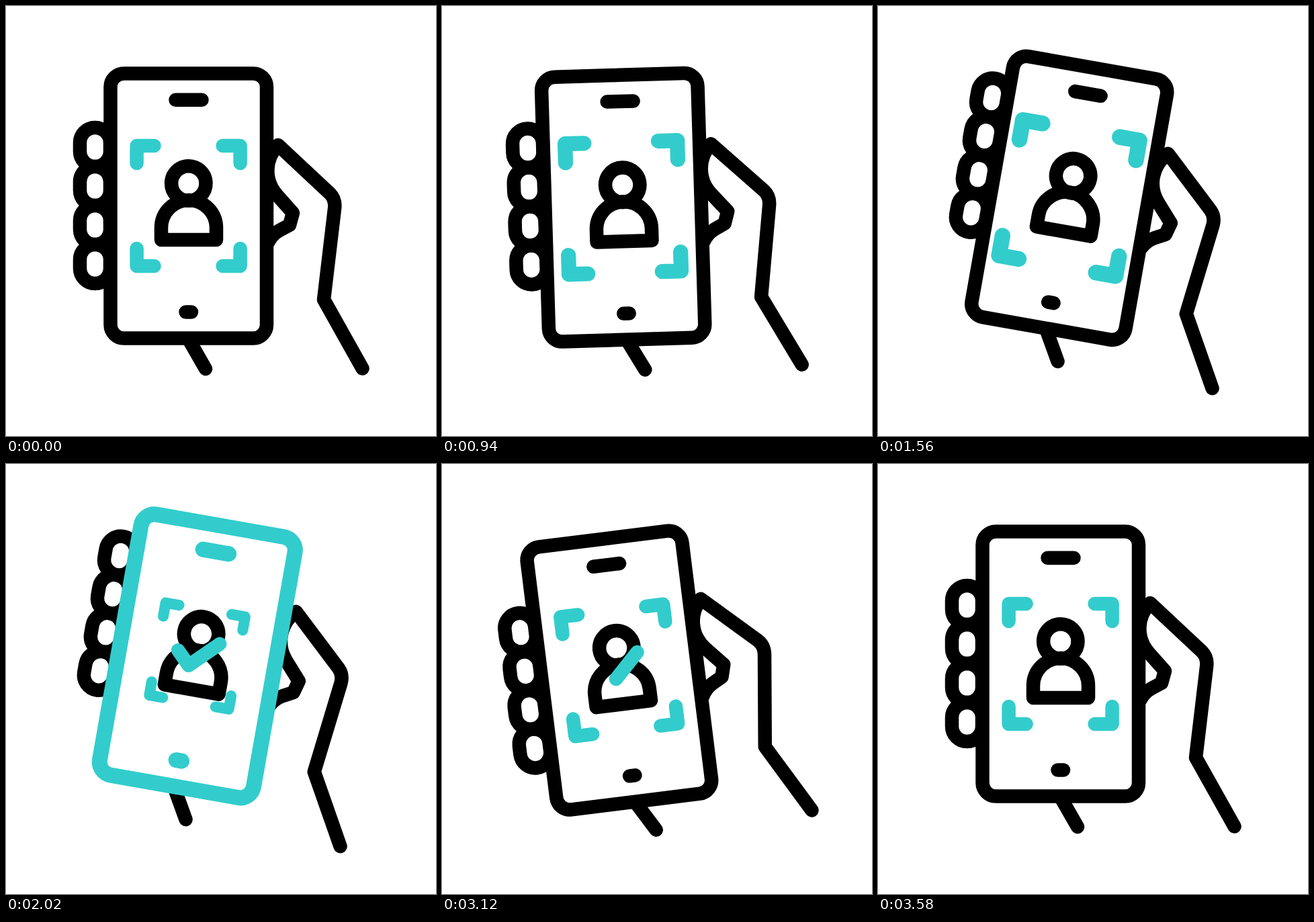
Recreate the animation shown at these times as an HTML page. Size 640 px wide and 640 px high, loop 3600 ms.

```html
<!DOCTYPE html>
<html lang="en">
<head>
<meta charset="utf-8">
<title>Face scan on a phone</title>
<style>
  html, body { margin: 0; width: 100%; height: 100%; overflow: hidden; background: #fff; }
  svg { display: block; width: 100%; height: 100%; }
  g { fill: none; stroke: #000; stroke-width: 20.5; stroke-linecap: round; stroke-linejoin: round; }
  .accent { stroke: #3cc; }
  #highlight { stroke-width: 23; }
</style>
</head>
<body>
<svg viewBox="0 0 640 640">
  <defs>
    <path id="frame" pathLength="1" d="M271.5 100.5H368a20 20 0 0 1 20 20V474.5a20 20 0 0 1-20 20H175.5a20 20 0 0 1-20-20V120.5a20 20 0 0 1 20-20Z"/>
    <path id="speaker" pathLength="1" d="M252.5 139.7h39"/>
    <path id="home" pathLength="1" d="M267.5 455.5h8.5"/>
    <rect id="finger" x="110" y="181" width="45" height="58" rx="22.5"/>
    <path id="corner" d="M-77-63.5v-26h26"/>
  </defs>
  <g id="scene">
    <g id="fingers"></g>
    <path id="wrist" d="M266 486L297 540"/>
    <path id="thumb" d="M390 352Q396 340 407 334L422 326L427 308L403 281C384 259 385 228 405 207L482 279Q491 288 489 302L473 437L530.5 539.5"/>
    <use href="#frame" fill="#fff"/>
    <use href="#speaker"/>
    <use href="#home"/>
    <circle cx="271.8" cy="264" r="25.7"/>
    <path id="body" d="M231 348V330a41 41 0 0 1 82 0V348Z"/>
    <g id="corners" class="accent"></g>
    <g id="highlight" class="accent">
      <use href="#frame"/><use href="#speaker"/><use href="#home"/>
    </g>
    <g id="check" class="accent">
      <path pathLength="1" d="M242 294L261.5 313.5L301.5 274"/>
    </g>
  </g>
</svg>
<script>
const LOOP = 3600;
const $ = id => document.getElementById(id);

for (let i = 0; i < 4; i++) {
  $('fingers').innerHTML += `<use href="#finger" y="${58 * i}"/>`;
  $('corners').innerHTML += `<use href="#corner" transform="scale(${i % 2 ? -1 : 1} ${i < 2 ? 1 : -1})"/>`;
}

// Smooth progress from 0 to 1 between two times.
function ease(t, start, end) {
  const u = Math.min(1, Math.max(0, (t - start) / (end - start)));
  return u * u * (3 - 2 * u);
}

function trim(el, start, end) {
  const length = end - start;
  el.style.visibility = length > .001 ? 'visible' : 'hidden';
  el.style.strokeDasharray = length > .999 ? 'none' : `${length} 2`;
  el.style.strokeDashoffset = -start;
}

function render(t) {
  // The hand leans left, swings right, then settles through a smaller left lean.
  const swing = ease(t, 760, 1100);
  const rebound = ease(t, 2800, 3235);
  const left = ease(t, 0, 440) - swing + .66 * (rebound - ease(t, 3235, 3580));
  const right = swing - rebound;
  $('scene').setAttribute('transform', `rotate(${10 * right - 16 * left} 345 366)`);
  $('fingers').setAttribute('transform', `translate(0 ${37 * left - 39.6 * right})`);

  // The scan corners widen, close in on the face, then widen again and relax.
  const widen = ease(t, 770, 1150) - ease(t, 2560, 2980);
  const close = ease(t, 1460, 1900) - ease(t, 2300, 2560);
  $('corners').setAttribute('transform', `translate(271.6 297.5) scale(${1 + .2 * widen - .42 * close})`);

  const drawn = ease(t, 1580, 1840);
  trim($('highlight'), ease(t, 2800, 3080), drawn);
  trim($('check'), ease(t, 2950, 3350), drawn);
}

const began = performance.now();
function tick() {
  render((performance.now() - began) % LOOP);
  requestAnimationFrame(tick);
}
tick();
</script>
</body>
</html>
```
